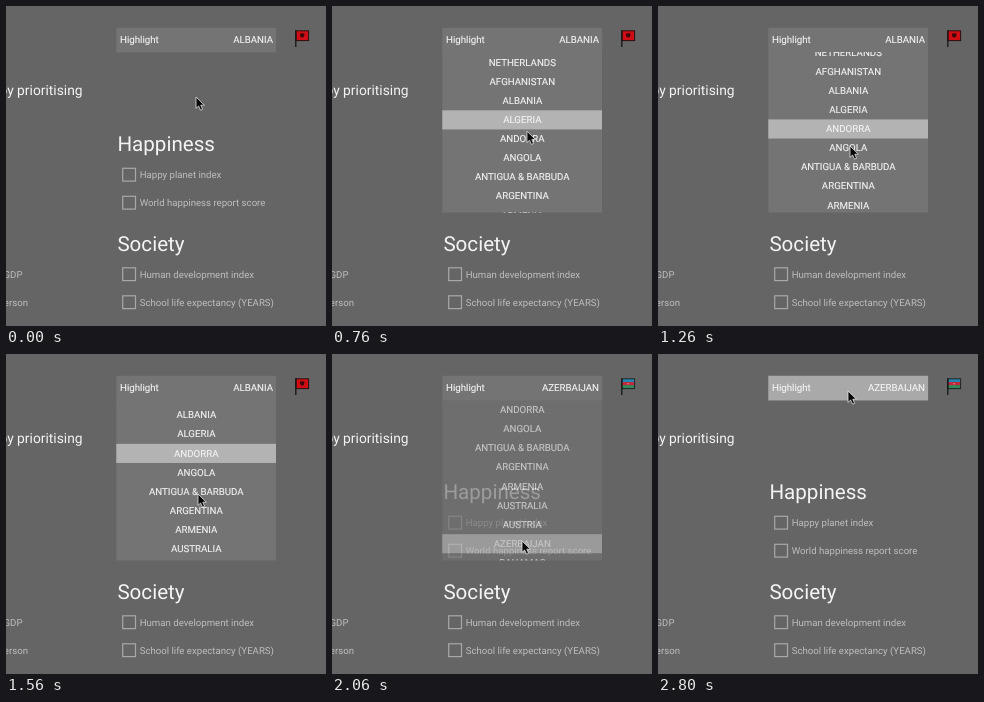
An HTML page for the animation above (2900 ms loop, 320 by 320 pixels).

```html
<!DOCTYPE html>
<html lang="en">
<head>
<meta charset="utf-8">
<title>Highlight menu</title>
<style>
  html, body { margin: 0; width: 100%; height: 100%; overflow: hidden; background: #656565; }
  svg { display: block; width: 100vw; height: 100vh; font-family: Roboto, Arial, sans-serif; }
  text { text-rendering: geometricPrecision; }
  .head { font-size: 20.6px; fill: #f4f4f4; }
  .label { font-size: 9.65px; fill: #bebebe; }
  .menu { font-size: 9.7px; fill: #f4f4f4; stroke: #f4f4f4; stroke-width: .12; }
  .end { text-anchor: end; }
  .mid { text-anchor: middle; }
  .box { fill: none; stroke: #a8a8a8; stroke-width: 1.2; }
</style>
</head>
<body>
<svg viewBox="0 0 320 320">
  <defs>
    <clipPath id="view"><rect x="110" y="46" width="160" height="160.5"/></clipPath>
  </defs>
  <rect width="320" height="320" fill="#656565"/>
  <text class="end" x="76.5" y="89" font-size="13.8" fill="#f4f4f4">by prioritising</text>
  <text class="label end" x="16.5" y="272">GDP</text>
  <text class="label end" x="22" y="300">person</text>
  <text class="head" x="111.4" y="145">Happiness</text>
  <text class="head" x="111.4" y="245">Society</text>
  <g id="options"></g>

  <rect x="110.3" y="21.8" width="159.8" height="24.6" fill="#747474"/>
  <rect id="glow" x="110.3" y="21.8" width="159.8" height="24.6" fill="#a9a9a9"/>
  <g id="list" clip-path="url(#view)">
    <rect x="110.3" y="46" width="159.8" height="161" fill="#747474"/>
    <g id="rows"></g>
  </g>
  <text class="menu" x="114" y="37.3">Highlight</text>
  <text id="value" class="menu end" x="267" y="37.3"></text>

  <g id="flagA">
    <rect x="290" y="24.8" width="12.6" height="9.8" fill="#d00d14" stroke="#2a1010"/>
    <path d="M293.8 27.8L296.2 27.2L298.6 27.8L298 30.2L296.2 32L294.4 30.2Z" fill="#3a0808"/>
  </g>
  <g id="flagB">
    <rect x="290" y="24.8" width="12.6" height="3.3" fill="#2485ae"/>
    <rect x="290" y="28.1" width="12.6" height="3.2" fill="#c4283e"/>
    <rect x="290" y="31.3" width="12.6" height="3.3" fill="#2f8a58"/>
    <circle cx="296.2" cy="29.7" r=".8" fill="#dc8f9b"/>
    <rect x="290" y="24.8" width="12.6" height="9.8" fill="none" stroke="#1f2626"/>
  </g>
  <path d="M289.8 24.3V41" stroke="#141414" stroke-width="1.3"/>

  <path id="cursor" d="M0 0V11.4L2.6 9L4.5 13.2L6.6 12.3L4.8 8.2H8.4Z"
        fill="#080808" stroke="#e4e4e4" stroke-width=".8"/>
</svg>
<script>
const LOOP = 2900, PITCH = 19.1, FIRST = 56.2;
const countries = ["NETHERLANDS", "AFGHANISTAN", "ALBANIA", "ALGERIA", "ANDORRA", "ANGOLA",
  "ANTIGUA & BARBUDA", "ARGENTINA", "ARMENIA", "AUSTRALIA", "AUSTRIA", "AZERBAIJAN", "BAHAMAS", "BAHRAIN"];
const options = [["Happy planet index", 169], ["World happiness report score", 197],
  ["Human development index", 268.5], ["School life expectancy (YEARS)", 296.5]];

// Keys are [time, value...]
const path = [[130, 190, 91], [420, 190, 40], [630, 191, 37], [690, 192, 68], [760, 195, 125],
  [830, 192, 140], [1880, 192, 140], [2000, 190, 187], [2330, 190, 187], [2360, 188, 174],
  [2620, 189, 62], [2800, 190, 37]];
const scroll = [[1010, 0], [1260, 10], [1480, 10], [1560, 33.4], [1700, 58], [1830, 74.1], [1900, 77]];
const hover = [[0, 2], [735, 3], [785, 4], [1910, 9], [1945, 10], [1970, 11]];

const $ = id => document.getElementById(id);
function add(parent, tag, attrs, text) {
  const el = document.createElementNS("http://www.w3.org/2000/svg", tag);
  for (const k in attrs) el.setAttribute(k, attrs[k]);
  if (text) el.textContent = text;
  return parent.appendChild(el);
}

for (const [text, y] of options) {
  add($("options"), "rect", { class: "box", x: 116.7, y: y - 6.7, width: 12.8, height: 12.8 });
  add($("options"), "text", { class: "label", x: 133.7, y: y + 3.3 }, text);
}
const mark = add($("rows"), "rect", { x: 110.3, width: 159.8, height: PITCH, fill: "#b3b3b3" });
countries.forEach((name, i) =>
  add($("rows"), "text", { class: "menu mid", x: 190.3, y: FIRST + i * PITCH + 3.5 }, name));

const ramp = (t, a, b) => Math.min(1, Math.max(0, (t - a) / (b - a)));

function track(keys, t, col = 1) {
  let i = 0;
  while (i < keys.length - 1 && keys[i + 1][0] <= t) i++;
  const a = keys[i], b = keys[i + 1] || a;
  return a === b ? a[col] : a[col] + (b[col] - a[col]) * ramp(t, a[0], b[0]);
}

function draw(t) {
  const picked = t >= 2030;
  $("value").textContent = picked ? "AZERBAIJAN" : "ALBANIA";
  $("flagA").setAttribute("opacity", picked ? 0 : 1);
  $("flagB").setAttribute("opacity", picked ? 1 : 0);
  $("list").setAttribute("opacity", ramp(t, 640, 750) - ramp(t, 2020, 2150));
  $("glow").setAttribute("opacity", ramp(t, 370, 470) - ramp(t, 650, 750) + ramp(t, 2680, 2780));
  $("rows").setAttribute("transform", `translate(0 ${-track(scroll, t)})`);
  const row = hover.filter(h => h[0] <= t).pop()[1];
  mark.setAttribute("y", FIRST + (row - .48) * PITCH);
  $("cursor").setAttribute("transform", `translate(${track(path, t)} ${track(path, t, 2)})`);
}

function tick() {
  draw(performance.now() % LOOP);
  requestAnimationFrame(tick);
}
tick();
</script>
</body>
</html>
```
